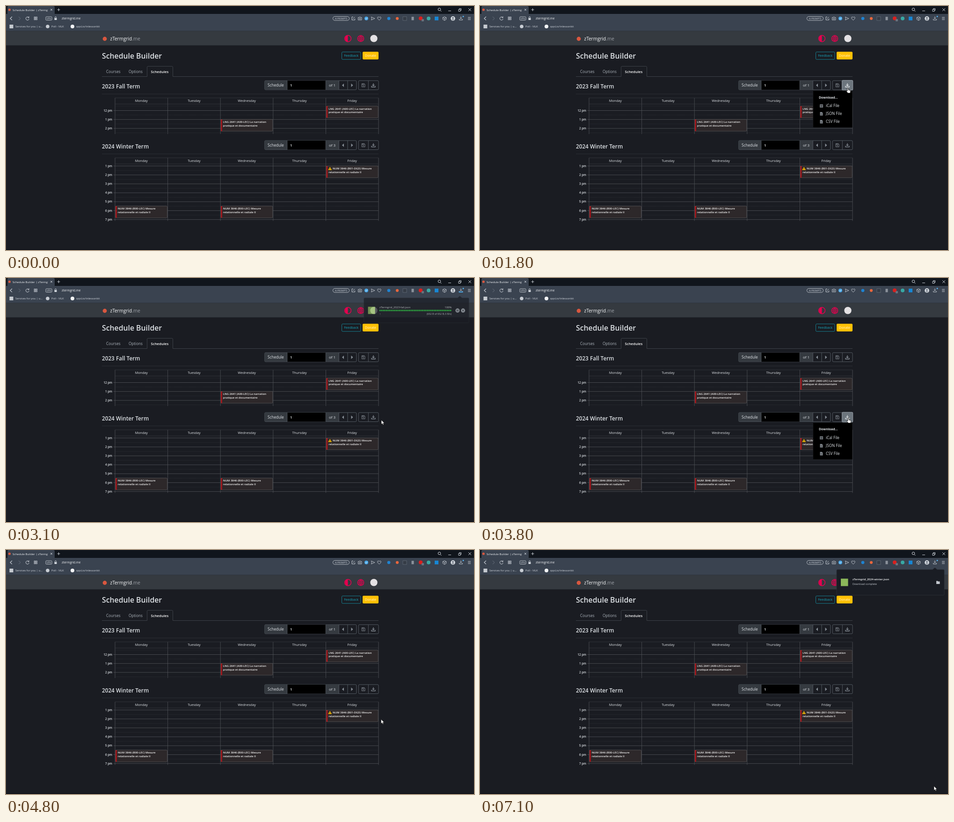
Write an HTML page that moves like this. It is 1000 px wide and 524 px high and loops after 7200 ms.

```html
<!DOCTYPE html>
<html lang="en">
<head>
<meta charset="utf-8">
<title>Schedule Builder</title>
<style>
html, body { margin: 0; width: 100%; height: 100%; overflow: hidden; background: #1a1c22; }
svg { display: block; width: 100vw; height: 100vh; }
text { font-family: "Open Sans", "Noto Sans", sans-serif; white-space: pre; }
</style>
</head>
<body>
<svg id="stage" viewBox="0 0 1000 524" xmlns="http://www.w3.org/2000/svg"></svg>
<script>
const LOOP = 7200, STEP = 100;
const TERM_GAP = 128.7;
const LIGHT = '#dee2e6', GREY = '#adb5bd', EDGE = '#596068', PINK = '#e6004f';

const rect = (x, y, w, h, fill, more = '') =>
  `<rect x="${x}" y="${y}" width="${w}" height="${h}" fill="${fill}" ${more}/>`;
const disc = (x, y, r, fill, more = '') =>
  `<circle cx="${x}" cy="${y}" r="${r}" fill="${fill}" ${more}/>`;
const path = (d, stroke, width = 1, fill = 'none') =>
  `<path d="${d}" stroke="${stroke}" stroke-width="${width}" fill="${fill}"/>`;
const text = (x, y, size, fill, str, more = '') =>
  `<text x="${x}" y="${y}" font-size="${size}" fill="${fill}" ${more}>${str}</text>`;
const group = (id, body, more = '') => `<g id="${id}" ${more}>${body}</g>`;
const MID = 'text-anchor="middle"', END = 'text-anchor="end"', SEMI = 'font-weight="600"';

function browser() {
  const ink = '#d3d8df';
  let s = rect(0, 0, 1000, 17, '#10151c') + rect(0, 17, 1000, 36.5, '#3a4350');
  s += `<path d="M3 17V3q0-3 3-3h95q3 0 3 3v14z" fill="#3a4350"/>`;
  s += disc(7.5, 8, 2.6, '#d9573f') + text(14, 10.7, 6.1, '#f2f4f6', 'Schedule Builder | zTermg');
  s += path('M95 6l4 4m0-4l-4 4M109.500 8h6m-3-3v6', ink, .9);
  s += path('M928 9.500l2.500 2.500M945 10.500h6M967 7.500h4v4h-4zM968.500 7V5.500h4v4h-1.500M988 5l6 6m0-6l-6 6', ink, .9);
  s += disc(926, 7.2, 2.8, 'none', `stroke="${ink}"`);

  s += path('M13 23l-4 3.700 4 3.700', ink, 1.1) + path('M27 23l4 3.700-4 3.700', '#69727e', 1);
  s += path('M48.500 24.500a3.500 3.500 0 1 0 .8 3.200M49 22.500v2.700h-2.700', ink, 1);
  for (let i = 0; i < 4; i++)
    s += rect(60.2 + (i % 2) * 3.7, 23.4 + (i >> 1) * 3.7, 2.6, 2.6, 'none', `stroke="${ink}" stroke-width=".8"`);
  s += rect(85, 23, 13, 7.5, 'none', `rx="1.500" stroke="${ink}" stroke-width=".8"`);
  s += text(91.5, 28.6, 4.6, ink, 'VPN', MID);
  s += rect(103.5, 26, 5, 4, ink, 'rx=".600"') + path('M104.500 26v-1.500a1.500 1.500 0 0 1 3 0V26', ink, .9);
  s += text(119, 29, 6.4, '#f2f4f6', 'ztermgrid.me');
  s += rect(698.5, 22.5, 35, 8.5, 'none', `rx="4.200" stroke="${ink}" stroke-width=".8"`);
  s += text(716, 28.5, 4.6, ink, 'AI PROMPTS', MID);
  s += path('M742 23.500h-3v6.500h6.500v-3M741 28l4.500-4.500', ink, .9);
  s += path('M752.500 24.500h2l.7-1h2l.7 1h2V30h-7.400z', ink, .8) + disc(756.2, 27.1, 1.4, 'none', `stroke="${ink}" stroke-width=".8"`);
  s += disc(770, 26.8, 4, '#4aa8e8') + path('M768 26.800l1.500 1.500 2.500-3', '#fff', .9);
  s += path('M780.500 23.500l7.500 3.300-7.500 3.300 1.200-3.300z', ink, .8);
  s += path('M797.500 30.300c-6-4-3.500-9 0-5.800 3.500-3.200 6 1.800 0 5.800z', ink, .9);
  s += disc(818, 26.8, 3.4, '#1f83d1') + disc(836, 26.8, 3.1, '#e9663c');
  s += rect(848, 23, 8, 8, '#343b45', 'stroke="#69727e" stroke-width=".700"');
  s += rect(866.5, 23.2, 5, 7.3, '#8b929b') + disc(886, 26.6, 4.1, '#d9201f');
  s += rect(888, 28, 5, 5, '#68717d', 'rx="1"');
  s += disc(903, 26.8, 4, '#38a9a4') + rect(916, 22.8, 8, 8, '#1787d5');
  s += path('M937 23l3.700 1.800v4L937 31l-3.700-2.200v-4zM933.300 24.800l3.700 2 3.700-2M937 26.800V31', ink, .8);
  s += disc(955, 26.8, 4.8, '#d5dae0') + disc(955, 25.5, 1.7, '#59626f') + path('M952 29.800q3-3.500 6 0z', 'none', 0, '#59626f');
  s += path('M972 22.500v5m-2-2l2 2 2-2M968.500 28v2h7v-2', ink, .9) + disc(977, 22.5, 1.5, '#5ab4f0');
  s += path('M987 24.300h6M987 26.800h6M987 29.300h6', ink, .8);

  s += rect(7.5, 40, 8, 8, '#c5cad0') + text(20, 46.2, 5.9, ink, 'Services for you | u...');
  s += disc(89, 44, 3.8, '#c9ced5') + text(97, 46.2, 5.9, ink, 'Poll - ViLK');
  s += disc(142, 44, 4, '#f3f5f7') + text(150, 46.2, 5.9, ink, 'qqvLio/tnlessonkit');
  return s;
}

function header() {
  let s = rect(0, 53.5, 1000, 31, '#353a40');
  s += disc(211, 70.5, 4.4, '#d9573f');
  s += text(222.5, 73.6, 10, '#f8f9fa', 'zTermgrid<tspan fill="#9ca1a7">.me</tspan>');
  s += disc(730.5, 69.8, 6.9, 'none', `stroke="${PINK}" stroke-width="1.500"`);
  s += path('M730.500 63a6.900 6.900 0 0 0 0 13.700z', 'none', 0, PINK);
  s += disc(758, 69.8, 6.6, 'none', `stroke="${PINK}" stroke-width="1.300"`);
  s += path('M751.500 69.800h13M752.500 66.500h11M752.500 73h11M758 63v13.500M758 63.200q-6 6.600 0 13.200q6-6.600 0-13.200', PINK, 1);
  s += disc(786, 69.8, 7.7, '#e4e1e3');
  s += text(205, 113, 15.8, LIGHT, 'Schedule Builder', SEMI);
  s += rect(717.5, 98.7, 40.5, 16, 'none', 'rx="2" stroke="#1795a9" stroke-width=".8"');
  s += text(737.7, 109.3, 7, '#17a2b8', 'Feedback', MID);
  s += rect(762, 98.2, 34, 16.6, '#ffc107', 'rx="2"') + text(779, 109.3, 7, '#fff3c9', 'Donate', MID);
  s += path('M205 151.500H301.500V131.500q0-2 2-2h51q2 0 2 2V151.500H796', '#41464d', .9);
  s += text(214, 143.7, 8.1, GREY, 'Courses') + text(262, 143.7, 8.1, GREY, 'Options');
  return s + text(309.5, 143.7, 7.8, '#fff', 'Schedules', SEMI);
}

const downArrow = fill => path('M785 166v5.500m-2.300-2.300l2.300 2.300 2.300-2.300', fill, 1.3) +
  path('M781 171.500v2.500h8v-2.500', fill, 1.3);

function toolbar(count) {
  const icon = '#858c94';
  let s = rect(552.8, 160.3, 196, 19.6, 'none', `rx="2" stroke="${EDGE}" stroke-width=".9"`);
  s += rect(553.2, 160.7, 47.5, 18.8, '#353a40', 'rx="1.500"') + rect(601, 160.3, 82.5, 19.6, '#000');
  s += rect(683.5, 160.7, 27.5, 18.8, '#353a40');
  s += path('M600.800 160.300v19.600M683.300 160.300v19.600M711.300 160.300v19.600M730 160.300v19.600', EDGE, .9);
  s += text(559, 173, 8.2, LIGHT, 'Schedule') + text(607, 173.2, 7.8, '#f1f3f5', '1', SEMI);
  s += text(690, 173, 8, LIGHT, 'of ' + count);
  s += path('M722 166.500v7.500l-4-3.700zM737.500 166.500v7.500l4-3.700z', 'none', 0, icon);
  s += rect(753.3, 160.3, 42.7, 19.6, 'none', `rx="2" stroke="${EDGE}" stroke-width=".9"`);
  s += path('M774.300 160.300v19.600', EDGE, .9);
  s += path('M760.300 166.800h5.200l1.500 1.500v5.500h-6.700zM761.800 167v2h3v-2', icon, .9) + disc(763.6, 171.4, 1, icon);
  return s + downArrow(icon);
}

function menuIcon(y, fill, grid) {
  if (!grid) return path(`M726.500 ${y - 3.500}h4l2 2v5.500h-6z`, 'none', 0, fill) +
    path(`M727.500 ${y}h4m-4 2h4`, '#222', .7);
  return rect(726, y - 3, 7, 6.7, fill, 'rx=".7"') +
    path(`M726.500 ${y - 1}h6m-6 2h6M728.300 ${y - 1}v4m2.300-4v4`, '#111', .6);
}

function menu(i) {
  let s = rect(773.6, 159.6, 23, 21, '#6c757d', 'rx="2" stroke="#8b939b" stroke-width="1.200"') + downArrow('#dfe3e6');
  s += rect(711.7, 181.8, 84, 79.2, '#000', 'stroke="#24272b" stroke-width=".6" rx="1"');
  s += text(724, 198.8, 6.9, LIGHT, 'Download...', 'font-weight="700"');
  s += group('pick' + i, rect(711.7, 222.8, 84, 16.9, '#2d8ee3'));
  ['iCal', 'JSON', 'CSV'].forEach((kind, k) => {
    const y = 214.2 + 17 * k, name = kind === 'JSON' ? `id="item${i}"` : '';
    s += menuIcon(y, '#858b92', k === 0) + text(739, y + 3, 8.2, LIGHT, kind + ' File', name);
  });
  return group('menu' + i, s, `transform="translate(0 ${i * TERM_GAP})"`);
}

function entry(x, y, first, second, warn) {
  let s = rect(x, y, 111, 25.5, '#2d282a', 'rx="2" stroke="#57575a" stroke-width=".8"');
  s += path(`M${x + 1.700} ${y + .5}v24.500`, '#7d1419', 2.6);
  s += `<path d="M${x + 1.700} ${y + .5}v24.500" stroke="#d01a20" stroke-width="2.600" stroke-dasharray="1.300 1.300"/>`;
  if (warn) {
    s += path(`M${x + 8} ${y + 2.700}l3.500 6h-7z`, '#f2b705', .6, '#f2b705');
    s += path(`M${x + 8} ${y + 4.500}v2m0 .7v1`, '#222', .8);
  }
  s += text(x + (warn ? 13.8 : 5), y + 7.8, 5.95, '#f4f4f4', first, SEMI);
  return s + text(x + 5, y + 15.2, 5.95, '#f4f4f4', second, SEMI);
}

function calendar(top, bottom, firstY, hours) {
  const line = '#53565b', pitch = 19.17;
  let s = '';
  ['Monday', 'Tuesday', 'Wednesday', 'Thursday', 'Friday'].forEach((day, i) => {
    s += text(289.3 + 112.6 * i, top + 8.5, 7.15, LIGHT, day, MID);
  });
  for (let i = 0; i < 6; i++) s += path(`M${233 + 112.6 * i} ${top}V${bottom}`, line, .8);
  s += path(`M233 ${top}H796M233 ${top + 13.200}H796`, '#3b3e44', .7);
  hours.forEach((h, i) => {
    const y = firstY + pitch * i;
    s += path(`M229.500 ${y}H796`, line, .8) + text(227, y + 2.2, 6.2, LIGHT, h + ' pm', END + ' ' + SEMI);
  });
  for (let y = firstY - pitch / 2; y < bottom; y += pitch)
    if (y > top + 14) s += `<path d="M233 ${y}H796" stroke="#363940" stroke-width=".7" stroke-dasharray="1 1"/>`;
  return s;
}

function term(i, title, count) {
  return `<g transform="translate(0 ${i * TERM_GAP})">` +
    text(205, 177, 11.75, LIGHT, title, SEMI) +
    path('M205 189H796', '#30343a', .8) + toolbar(count) +
    group('hover' + i, rect(774.3, 160.3, 21.7, 19.6, '#6c757d', 'rx="1.500"') + downArrow('#dfe3e6')) + '</g>';
}

function panel() {
  const name = 'zTermgrid_2023-fall.json';
  let s = '<path d="M764 42H967l5-4 5 4h13q2 0 2 2V95q0 2-2 2H764q-2 0-2-2V44q0-2 2-2z" fill="#1a1d24" stroke="#2c3038" stroke-width=".8"/>';
  s += rect(771, 61.5, 15.5, 16, '#8cb85a');
  let busy = text(796, 64.5, 6, '#f1f3f5', name) + text(954, 64.5, 6, '#f1f3f5', '100%', END);
  busy += path('M796 69.700H954', '#176c25', 3);
  busy += '<path d="M796 69.700H954" stroke="#35d34c" stroke-width="3" stroke-dasharray="1.800 1.800"/>';
  busy += text(796, 79, 5.5, '#d0d5db', '↑') + text(954, 79, 5.4, '#e2e6ea', '(652 B of 652 B, 0 B/s)', END);
  busy += disc(967, 69.8, 4.6, '#a6acb4') + path('M965.800 67.800v4m2.400-4v4', '#1a1d24', 1);
  busy += disc(979, 69.8, 4.6, '#a6acb4') + path('M977.300 68.100l3.400 3.400m0-3.400l-3.400 3.400', '#1a1d24', 1);
  let done = text(796, 65, 5.9, '#f8f9fa', name, `id="file" ${SEMI}`) + text(796, 75, 5.55, '#c9ced4', 'Download complete');
  done += path('M975 66.500h3l.8 1h3.700v5.500H975z', 'none', 0, '#c3c8ce');
  return group('panel', s + group('busy', busy) + group('done', done));
}

function pointer() {
  const arrow = '<path d="M0 0V9.300L2.200 7.300 3.700 10.500 5.200 9.800 3.800 6.700H6.700Z" fill="#fff" stroke="#000" stroke-width=".6"/>';
  const hand = '<path d="M-1 .8Q0-.6 1 .8V4.500L5 5.400Q6 5.700 5.800 7L5 11.500H0L-3.300 7.300Q-3.300 5.800-1 7Z" fill="#fff" stroke="#000" stroke-width=".7"/>' +
    path('M2.200 5v1.800M4 5.300v1.700', '#555', .5);
  return group('pointer', group('arrow', arrow) + group('hand', hand));
}

const language = ['LNG 2641 (A00-LEC) La narration', 'pratique et documentaire'];
const lecture = ['NUM 3846 (B00-LEC) Mesure', 'relationnelle et radiale II'];
const tutorial = ['NUM 3846 (B01-DGD) Mesure', lecture[1]];

document.getElementById('stage').innerHTML =
  rect(0, 0, 1000, 524, '#1a1c22') + browser() + header() +
  term(0, '2023 Fall Term', 1) + calendar(197.3, 275, 224.5, [12, 1, 2]) +
  entry(684.2, 214.8, ...language) + entry(458.8, 243.4, ...language) +
  term(1, '2024 Winter Term', 3) + calendar(326, 461.5, 343.6, [1, 2, 3, 4, 5, 6, 7]) +
  entry(684.2, 343.4, ...tutorial, true) + entry(233.7, 429.6, ...lecture) + entry(458.8, 429.6, ...lecture) +
  rect(0, 522.3, 1000, 1.7, '#0e1117') + menu(0) + menu(1) +
  group('underline', rect(967.5, 29, 9, 2, '#4aa8e8')) + panel() + pointer();

const node = {};
document.querySelectorAll('[id]').forEach(el => node[el.id] = el);
const show = (id, on) => node[id].style.display = on ? '' : 'none';

// time, x, y of the pointer tip
const route = [
  [500, 940, 290], [800, 880, 230], [1200, 800, 171], [1500, 786, 170.5], [1700, 786, 175.500],
  [1800, 786, 175.500], [2300, 773, 230], [2700, 773, 231], [3100, 802, 305], [3200, 801, 305],
  [3500, 787, 300], [4000, 787, 300], [4300, 775.500, 358.500], [4600, 775.500, 358.500],
  [5100, 849, 373], [5500, 849, 373], [5600, 851, 375], [6300, 969, 506], [6600, 969, 506], [6700, 970, 507]
];

function pointerAt(t) {
  let i = route.findIndex(p => p[0] > t);
  if (i < 0) return route[route.length - 1].slice(1);
  if (i === 0) return route[0].slice(1);
  const [t0, x0, y0] = route[i - 1], [t1, x1, y1] = route[i];
  const k = (t - t0) / (t1 - t0), e = k * k * (3 - 2 * k);
  return [x0 + (x1 - x0) * e, y0 + (y1 - y0) * e];
}

const visits = [
  { open: 1700, pick: 2700, load: 3000, close: 3600, file: 'zTermgrid_2023-fall.json' },
  { open: 3600, pick: 4600, load: 4900, close: LOOP, file: 'zTermgrid_2024-winter.json' }
];

function draw(t) {
  const [x, y] = pointerAt(t);
  const within = (l, r, a, b) => t >= 500 && x >= l && x <= r && y >= a && y <= b;
  let hand = false, loading = null;
  visits.forEach((v, i) => {
    const dy = i * TERM_GAP, open = t >= v.open && t < v.pick;
    const hover = within(774, 796, 160 + dy, 180 + dy);
    const pick = open && within(712, 796, 222.8 + dy, 239.7 + dy);
    show('menu' + i, open);
    show('hover' + i, hover);
    show('pick' + i, pick);
    node['item' + i].setAttribute('fill', pick ? '#12283c' : LIGHT);
    hand = hand || hover || (open && within(712, 796, 206 + dy, 257 + dy));
    if (t >= v.load && t < v.close) loading = v;
  });

  show('panel', loading);
  const shown = loading ? Math.min(1, .2 + .5 * (t - loading.load) / 100) : 0;
  show('underline', loading && shown < 1);
  if (loading) {
    const scale = .92 + .08 * shown;
    node.panel.setAttribute('opacity', shown);
    node.panel.setAttribute('transform', `translate(877 70) scale(${scale}) translate(-877 -70)`);
    show('busy', shown < 1);
    show('done', shown === 1);
    node.file.textContent = loading.file;
    node.busy.firstChild.textContent = loading.file;
  }

  show('pointer', t >= 500);
  show('arrow', !hand);
  show('hand', hand);
  node.pointer.setAttribute('transform', `translate(${x.toFixed(2)} ${y.toFixed(2)})`);
}

const start = performance.now();
function tick() {
  const t = (performance.now() - start) % LOOP;
  draw(Math.floor(t / STEP) * STEP);
  requestAnimationFrame(tick);
}
tick();
</script>
</body>
</html>
```
